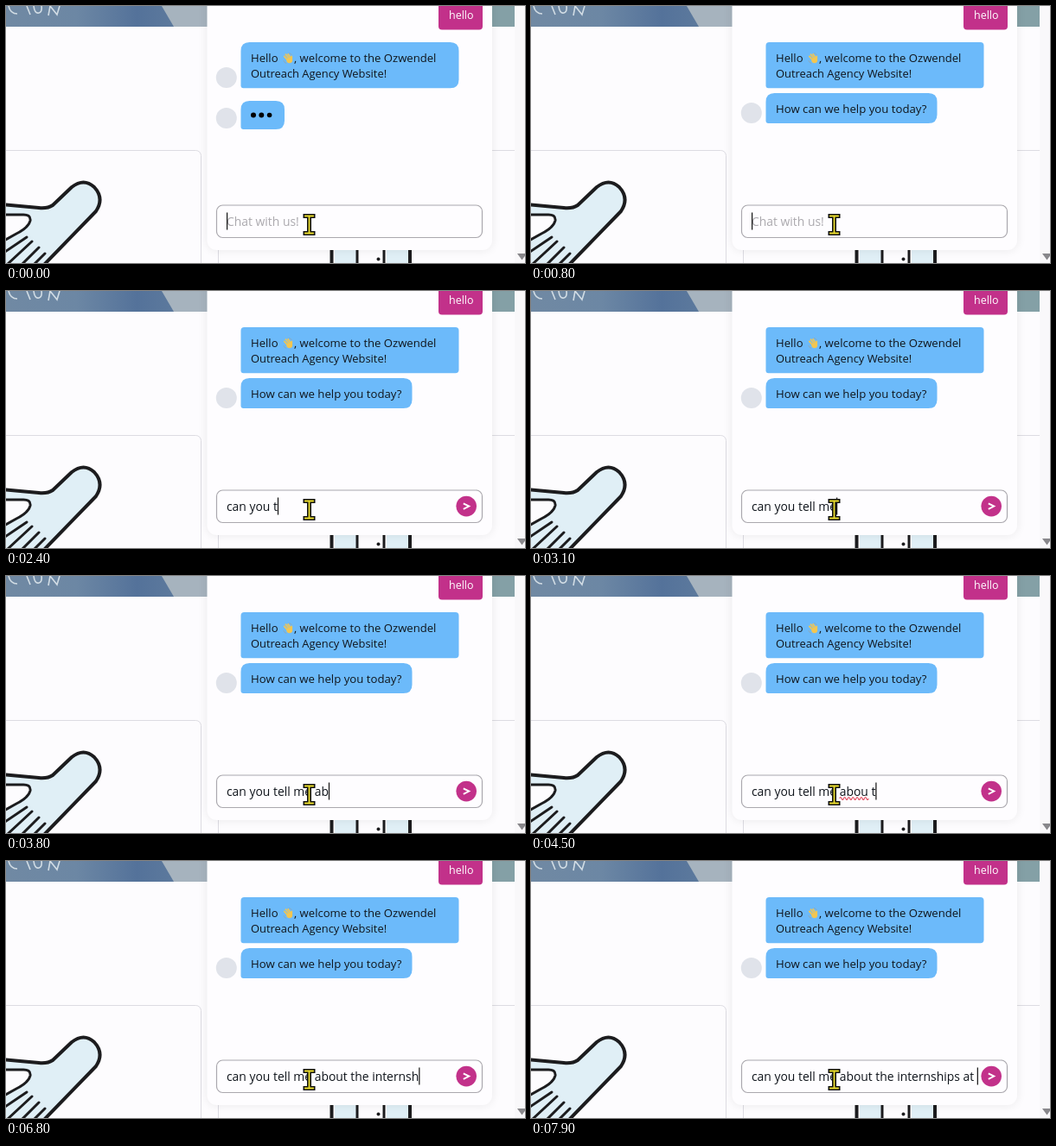
An HTML page for the animation above (8000 ms loop, 600 by 298 pixels).

```html
<!DOCTYPE html>
<html lang="en">
<head>
<meta charset="utf-8">
<title>Chat widget</title>
<style>
  html, body { margin: 0; width: 100%; height: 100%; overflow: hidden; background: #fdfcfe; }
  svg { display: block; width: 600px; height: 298px; }
  text { font-family: "Open Sans", "Noto Sans", sans-serif; font-size: 13.1px; fill: #10151c; white-space: pre; }
  .field { font-size: 13.9px; }
  .bubble { fill: #6cbafa; }
  .ink { fill: none; stroke: #1c1c1e; stroke-width: 4; stroke-linecap: round; stroke-linejoin: round; }
  .thin { stroke-width: 3; }
  .avatar { fill: #e0e3ea; }
  .card { fill: #fdfcfe; stroke: #dddce2; }
</style>
</head>
<body>
<svg viewBox="0 0 600 298">
  <defs>
    <linearGradient id="photo">
      <stop offset="0" stop-color="#7089a3"/>
      <stop offset=".35" stop-color="#6c87a4"/>
      <stop offset=".65" stop-color="#54729a"/>
      <stop offset="1" stop-color="#64809f"/>
    </linearGradient>
    <filter id="soft" x="-10%" y="-10%" width="120%" height="120%"><feGaussianBlur stdDeviation="6"/></filter>
  </defs>

  <!-- page -->
  <rect width="600" height="298" fill="#fdfcfe"/>
  <rect width="233" height="24" fill="url(#photo)"/>
  <path d="M180 0H233V24H194Z" fill="#a6b3be"/>
  <rect x="562" width="26" height="24" fill="#84a0a6"/>
  <path d="M3 0Q5 9 13 9M24 0L28 10M32 0Q33 9 38 8Q42 7 41 0M49 11L51 0L59 10L62 0" fill="none" stroke="#e3ebf0" stroke-width="1.6" opacity=".85"/>
  <rect class="card" x="-10" y="167.5" width="235.5" height="150" rx="6"/>
  <rect class="card" x="245.5" y="167.5" width="360" height="150" rx="6"/>

  <!-- reaching hand -->
  <path class="ink" style="fill:#e0eff6" d="M-6 230L38 234Q48 235 54 231L76 210Q90 199 102 210Q114 223 104 238L44 300V310H-6Z"/>
  <path class="ink thin" style="fill:#fdfcfe" d="M-6 242H18Q29 241 28 249Q26 257 12 264L-6 274"/>
  <path class="ink thin" d="M-4 287L24 268M2 299L30 273M18 300L38 280M31 301L45 287"/>

  <!-- door -->
  <path d="M380 270H405V300H380ZM440 270H465V300H440Z" fill="#e0eff6"/>
  <path class="ink" d="M376.5 270V302M467 270V302"/>
  <path class="ink thin" d="M406 270V302M437 270V302"/>
  <circle cx="430.500" cy="293.500" r="2" fill="#1c1c1e"/>

  <!-- scrollbar -->
  <rect x="588" width="12" height="298" fill="#f9f8fa"/>
  <path d="M591 287H602L596.500 294.500Z" fill="#88878b"/>

  <!-- chat panel -->
  <rect x="232.5" y="-30" width="329.5" height="313" rx="11" fill="#000" opacity=".08" filter="url(#soft)"/>
  <rect x="232.5" y="-30" width="329.5" height="313" rx="11" fill="#fefdff"/>
  <rect x="500" y="-20" width="51" height="47.5" rx="4" fill="#c2318a"/>
  <text x="512" y="15.3" style="fill:#fff;font-size:12.5px">hello</text>

  <path id="greeting" class="bubble"/>
  <text x="283" y="65">Hello</text>
  <text x="333" y="65">, welcome to the Ozwendel</text>
  <text x="283" y="83" style="font-size:12.9px">Outreach Agency Website!</text>
  <g stroke="#f3c651" stroke-width="2" stroke-linecap="round" fill="none" transform="translate(326 60.500) scale(.85) translate(-326.500 -60.500)">
    <path d="M321.5 58L326 63M323.5 55.5L328 61M326.5 55L330 60M331.5 58V63"/>
    <ellipse cx="328.5" cy="63.5" rx="3" ry="2.7" fill="#f3c651"/>
    <path d="M320.5 64Q321.5 67 324 67.5M328 53.5Q331 54 331.5 56" stroke="#8fa7b4" stroke-width="1"/>
  </g>

  <g id="waiting">
    <circle class="avatar" cx="254.8" cy="83" r="12"/>
    <circle class="avatar" cx="254.8" cy="130" r="12"/>
    <path id="dotBubble" class="bubble"/>
    <g id="dots">
      <circle cx="286" cy="126.5" r="3"/><circle cx="295.3" cy="126.5" r="3"/><circle cx="304.6" cy="126.5" r="3"/>
    </g>
  </g>
  <g id="reply">
    <circle class="avatar" cx="254.8" cy="124" r="12"/>
    <path id="replyBubble" class="bubble"/>
    <text x="283" y="123.7" style="font-size:13.2px">How can we help you today?</text>
  </g>

  <!-- input -->
  <rect x="243.5" y="231" width="307" height="37.5" rx="7" fill="#fefdff" stroke="#aaa8ae" stroke-width="1.2"/>
  <text id="hint" class="field" x="255" y="255" style="fill:#aba9ae">Chat with us!</text>
  <text id="typed" class="field" x="255" y="255"></text>
  <path id="squiggle" fill="none" stroke="#e0485c" stroke-width="1.1"/>
  <rect id="caret" y="239.5" width="1.2" height="20" fill="#111"/>
  <g id="send">
    <circle cx="532.2" cy="249.6" r="11.8" fill="#c2318a"/>
    <path d="M528.8 246.3L535.3 249.6L528.8 252.9" fill="none" stroke="#fff" stroke-width="1.9"/>
  </g>

  <!-- pointer -->
  <g fill="none" stroke-linecap="square">
    <path id="beam" d="M346 243.5H355M350.5 243.5V263.5M346 263.5H355" stroke="#111" stroke-width="5"/>
    <path d="M346 243.5H355M350.5 243.5V263.5M346 263.5H355" stroke="#e9dc2c" stroke-width="1.8"/>
  </g>
</svg>
<script>
const LOOP = 8000, REPLY_AT = 400, LEFT = 255;
// "<" stands for backspace
const KEYS = "can you tell me abou t<<t the internships at ";
// [time, keys pressed by then]
const PACE = [[1200, 0], [1650, 4], [3050, 15], [4450, 22], [5650, 30], [7800, 45]];

const $ = id => document.getElementById(id);
const show = (id, on) => $(id).setAttribute("visibility", on ? "visible" : "hidden");
const pen = document.createElement("canvas").getContext("2d");

// Speech bubble with a tight lower left corner
function bubble(id, x, y, w, h, r) {
  const c = 3;
  $(id).setAttribute("d", `M${x + r} ${y}h${w - 2 * r}q${r} 0 ${r} ${r}v${h - 2 * r}q0 ${r} ${-r} ${r}` +
    `H${x + c}q${-c} 0 ${-c} ${-c}V${y + r}q0 ${-r} ${r} ${-r}Z`);
}

function widthOf(text) {
  pen.font = '13.9px "Open Sans", "Noto Sans", sans-serif';
  return pen.measureText(text).width;
}

function keysPressed(t) {
  if (t <= PACE[0][0]) return 0;
  for (let i = 1; i < PACE.length; i++) {
    const [t0, n0] = PACE[i - 1], [t1, n1] = PACE[i];
    if (t < t1) return Math.floor(n0 + (n1 - n0) * (t - t0) / (t1 - t0));
  }
  return KEYS.length;
}

function textAfter(count) {
  let text = "";
  for (const key of KEYS.slice(0, count)) text = key === "<" ? text.slice(0, -1) : text + key;
  return text;
}

function wave(x0, x1, y) {
  let d = `M${x0} ${y}`;
  for (let x = x0, up = true; x < x1; x += 2.4, up = !up) d += `q1.2 ${up ? -3 : 3} 2.4 0`;
  return d;
}

function draw(now) {
  const t = Math.floor((now % LOOP) / 100) * 100;
  const text = textAfter(keysPressed(t));
  const replied = t >= REPLY_AT;

  show("waiting", !replied);
  show("reply", replied);
  bubble("greeting", 271.5, 42, 252, 53.3, replied ? 4 : 10);
  [...$("dots").children].forEach((dot, i) =>
    dot.setAttribute("r", 2.8 + 0.2 * Math.cos(t / 160 - i * 0.8)));

  $("typed").textContent = text;
  show("hint", !text);
  show("send", text);

  const start = text.indexOf("abou ");
  show("squiggle", start >= 0);
  if (start >= 0) {
    const x = LEFT + widthOf(text.slice(0, start));
    $("squiggle").setAttribute("d", wave(x, x + widthOf("abou"), 258));
  }

  $("caret").setAttribute("x", LEFT + widthOf(text));
  show("caret", text || t < 200 || t >= 700);
}

function tick(now) {
  draw(now);
  requestAnimationFrame(tick);
}
bubble("dotBubble", 271.5, 110, 50.5, 33, 10);
bubble("replyBubble", 271.5, 101, 198, 35, 10);
draw(0);
requestAnimationFrame(tick);
</script>
</body>
</html>
```
